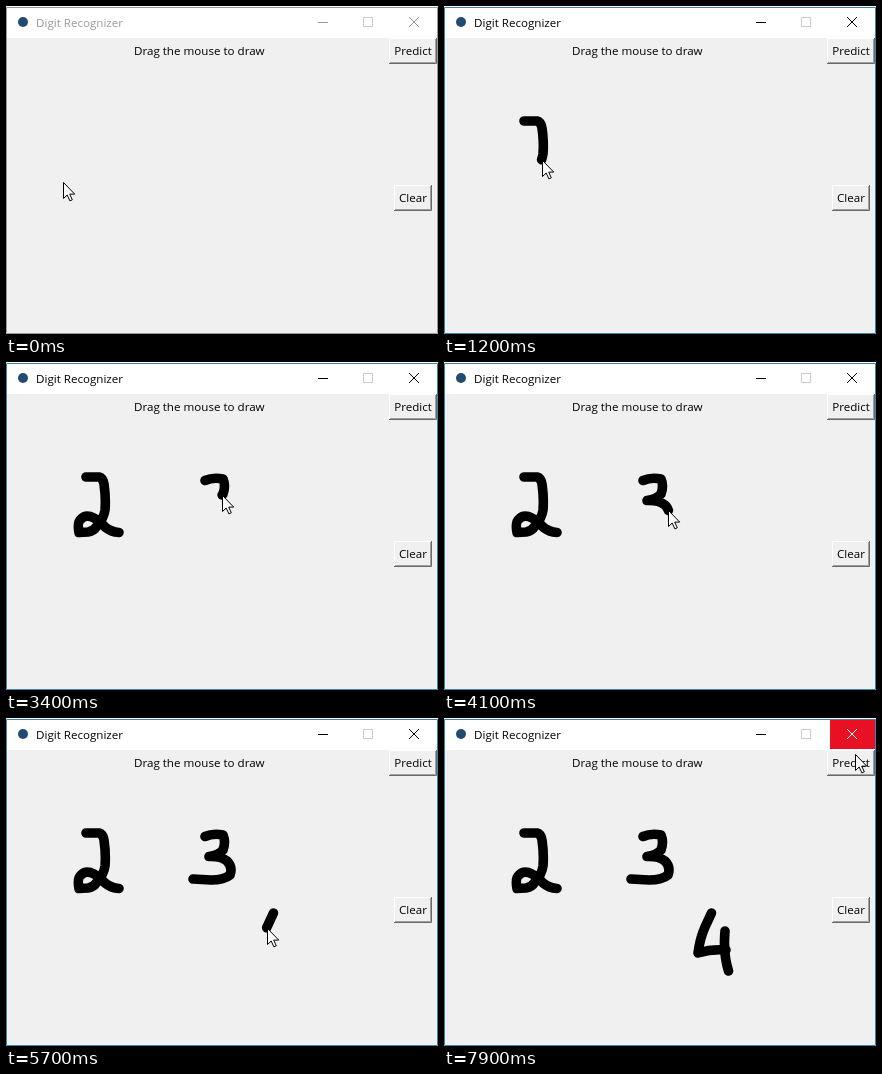
Animation of 432 by 328 pixels, one loop 8 s. Source, as an HTML page:

```html
<!DOCTYPE html>
<html lang="en">
<head>
<meta charset="utf-8">
<title>Digit Recognizer</title>
<style>
  html, body { margin: 0; width: 100%; height: 100%; overflow: hidden; background: #f0f0f0; }
  svg { display: block; width: 432px; height: 328px; }
  text { font: 11.6px "Open Sans", "Noto Sans", sans-serif; fill: #000; }
  .window { --frame: #3d84a6; --ink: #000; }
  .window.idle { --frame: #999; --ink: #999; }
  .frame { fill: none; stroke: var(--frame); }
  .title { fill: var(--ink); }
  .glyph { fill: none; stroke: var(--ink); }
  .off { fill: none; stroke: #ccc; }
  .hover { fill: none; }
  .closing .hover { fill: #e81123; }
  .closing .cross { stroke: #fff; }
  .ink path { fill: none; stroke: #000; stroke-width: 9.6; stroke-linecap: round; stroke-linejoin: round; }
</style>
</head>
<body>
<svg viewBox="0 0 432 328">
  <defs>
    <g id="face">
      <path d="M0 26V0H48" fill="none" stroke="#fff" stroke-width="2"/>
    </g>
  </defs>
  <g class="window" id="window">
    <rect width="432" height="328" fill="#f0f0f0"/>
    <rect width="432" height="32" fill="#fff"/>
    <rect class="hover" x="386" y="1" width="45" height="30"/>
    <circle cx="17" cy="16" r="5" fill="#234a70"/>
    <text class="title" x="30" y="21">Digit Recognizer</text>
    <path class="glyph" d="M312 16.5h10"/>
    <rect class="off" x="357.5" y="11.5" width="9" height="9"/>
    <path class="glyph cross" d="M403 11l10 10M413 11l-10 10"/>
    <text x="128" y="49">Drag the mouse to draw</text>
    <g id="buttons"></g>
    <path class="frame" d="M.5 1.5h431v326H.5z"/>
  </g>
  <g class="ink" id="ink"></g>
  <path id="cursor" fill="#fff" stroke="#000" d="M.5 .5v16l3.7-3.5 2.7 5.9 2.4-1.1-2.6-5.7h5z"/>
</svg>
<script>
const LOOP = 8000, STEP = 100;
const $ = id => document.getElementById(id);
const make = (parent, tag, attrs) => {
  const node = document.createElementNS('http://www.w3.org/2000/svg', tag);
  for (const key in attrs) node.setAttribute(key, attrs[key]);
  return parent.appendChild(node);
};

function addButton(label, x, y, w, h) {
  const g = make($('buttons'), 'g', { transform: `translate(${x} ${y})` });
  make(g, 'rect', { width: w, height: h, fill: '#f0f0f0' });
  make(g, 'path', { d: `M.5 ${h}V.5H${w}`, fill: 'none', stroke: '#fff' });
  make(g, 'path', { d: `M1 ${h - 1.5}H${w - 1.5}V1`, fill: 'none', stroke: '#a0a0a0' });
  make(g, 'path', { d: `M0 ${h - .5}H${w - .5}V0`, fill: 'none', stroke: '#696969' });
  make(g, 'text', { x: w / 2, y: 17, 'text-anchor': 'middle' }).textContent = label;
}
addButton('Predict', 383, 32, 48, 26);
addButton('Clear', 388, 179, 38, 26);

// Each pen stroke: path, then [time, distance] stops; the last stop ends the path.
const strokes = [
  ['M80 115H93Q97 116 98 122Q100 136 99 148Q98 156 91 164Q88 169 82 170L73 170.5Q71 160 75 157Q80 152 88 156Q94 159 99 165Q105 170 113 170.5',
    [700, 0], [1200, 54], [2300]],
  ['M199 118.5Q207 115 217 117Q220 124 217 132Q213 137 203 138.5Q215 138 221 143Q227 149 224 157Q218 162 205 162L187 161',
    [3000, 0], [3400, 35], [3800, 51], [4700]],
  ['M267.5 195L261 209Q256 220 254 235Q267 231 282 232', [5400, 0], [6700]],
  ['M281 213Q279 236 284.5 253', [6900, 0], [7400]]
].map(([d, ...stops]) => {
  const path = make($('ink'), 'path', { d });
  const length = path.getTotalLength();
  stops[stops.length - 1][1] = length;
  return { path, length, stops, start: stops[0][0], end: stops[stops.length - 1][0] };
});

// Pointer travel between strokes: [time, x, y].
const travel = [
  [[0, 57, 176], [500, 80, 115]],
  [[2400, 113, 171], [2500, 207, 95], [2800, 199, 118]],
  [[4700, 187, 161], [5300, 268, 195]],
  [[6700, 282, 232], [6900, 281, 213]],
  [[7500, 284, 253], [7800, 408, 14], [7900, 411, 36]]
];

function valueAt(stops, t, column = 1) {
  if (t <= stops[0][0]) return stops[0][column];
  const next = stops.findIndex(s => s[0] > t);
  if (next < 0) return stops[stops.length - 1][column];
  const a = stops[next - 1], b = stops[next];
  return a[column] + (b[column] - a[column]) * (t - a[0]) / (b[0] - a[0]);
}

function pointer(t) {
  const pen = strokes.find(s => t >= s.start && t <= s.end);
  if (pen) return pen.path.getPointAtLength(valueAt(pen.stops, t));
  const move = travel.filter(m => m[0][0] <= t).pop();
  return { x: valueAt(move, t, 1), y: valueAt(move, t, 2) };
}

function draw(now) {
  const t = Math.floor(now % LOOP / STEP) * STEP;
  for (const { path, length, stops, start } of strokes) {
    path.style.display = t < start ? 'none' : '';
    path.style.strokeDasharray = `${valueAt(stops, t)} ${length + 20}`;
  }
  $('window').classList.toggle('idle', t < 700);
  $('window').classList.toggle('closing', t >= 7800);
  const { x, y } = pointer(t);
  $('cursor').setAttribute('transform', `translate(${Math.round(x)} ${Math.round(y)})`);
  requestAnimationFrame(draw);
}
draw(performance.now());
</script>
</body>
</html>
```
